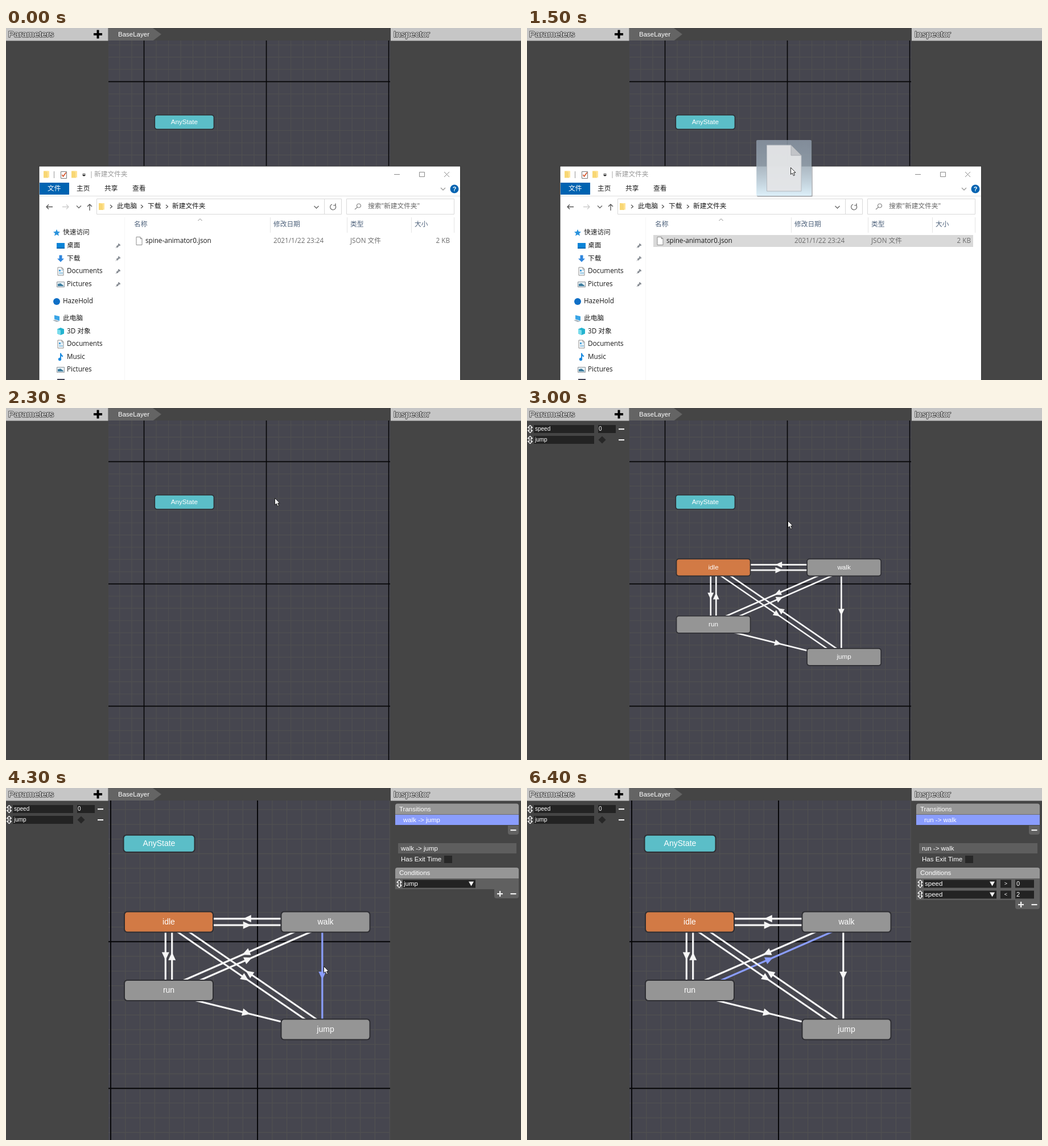
Recreate the animation shown at these times as an HTML page with a canvas. Size 905 px wide and 619 px high, loop 7400 ms.

```html
<!DOCTYPE html>
<html lang="zh">
<head>
<meta charset="utf-8">
<style>
html, body { margin: 0; width: 100%; height: 100%; overflow: hidden; background: #454545; }
canvas { display: block; }
</style>
</head>
<body>
<canvas id="stage" width="905" height="619"></canvas>
<script>
const c = document.getElementById('stage').getContext('2d');
const LOOP = 7400;
const UI = '"Liberation Sans", Arial, sans-serif';
const SHELL = '11.7px "Open Sans", "Noto Sans CJK SC", "Noto Sans CJK", sans-serif';
const BLUE = '#8a9dfd', FIELD = '#232323';

// Drawing helpers
function rect(x, y, w, h, fill) { c.fillStyle = fill; c.fillRect(x, y, w, h); }
function frame(x, y, w, h, color) {
  c.strokeStyle = color; c.lineWidth = 1; c.strokeRect(x + .5, y + .5, w - 1, h - 1);
}
function round(x, y, w, h, r, fill) {
  c.beginPath(); c.roundRect(x, y, w, h, r); c.fillStyle = fill; c.fill();
}
function disc(x, y, r, fill) { c.beginPath(); c.arc(x, y, r, 0, 7); c.fillStyle = fill; c.fill(); }
function path(d, x, y, fill, stroke, width = 1) {
  const p = new Path2D(d);
  c.save();
  c.translate(x, y);
  if (fill) { c.fillStyle = fill; c.fill(p); }
  if (stroke) { c.strokeStyle = stroke; c.lineWidth = width; c.stroke(p); }
  c.restore();
}
function text(s, x, y, color = '#fff', font = '11.5px ' + UI, align = 'left') {
  c.font = font; c.fillStyle = color; c.textAlign = align; c.textBaseline = 'middle';
  c.fillText(s, x, y);
}
const label = (s, x, y, color = '#1a1a1a', align) => text(s, x, y, color, SHELL, align);

// Cursor stops: time, x, y
const stops = [
  [300, 826, 106], [500, 690, 205], [700, 490, 314], [800, 400, 345], [900, 320, 370], [1000, 292, 378],
  [1200, 292, 378], [1300, 338, 336], [1400, 427, 309], [1500, 463, 245], [1600, 480, 175],
  [1700, 486, 135], [1800, 482, 114], [2000, 475, 150], [2300, 472, 158], [2800, 472, 158],
  [3000, 458, 198], [3200, 458, 198], [3300, 458, 205], [3600, 520, 235], [3900, 558, 302],
  [4100, 558, 313], [4400, 558, 313], [4700, 628, 235], [4900, 590, 207], [5200, 490, 270],
  [5400, 479, 275], [5700, 479, 275], [6300, 765, 180], [6400, 765, 180]
];
function cursorAt(t) {
  const i = Math.max(1, stops.findIndex(s => s[0] >= t));
  const [t0, x0, y0] = stops[i - 1], [t1, x1, y1] = stops[i];
  const k = (t - t0) / (t1 - t0);
  return [x0 + (x1 - x0) * k, y0 + (y1 - y0) * k];
}

// State graph
const nodes = {
  idle: [286, 235.5, '#d27a45'], walk: [561.5, 235.5, '#959595'],
  run: [286, 356, '#959595'], jump: [561.5, 424.5, '#959595']
};
const links = ['idle walk', 'walk idle', 'idle run', 'run idle', 'walk run', 'run walk',
  'idle jump', 'jump idle', 'walk jump', 'run jump'];

function node(name, x, y, w, h, fill, edge = '#2e2e33') {
  round(x - w / 2 - 2, y - h / 2 - 2, w + 4, h + 4, 6, edge);
  round(x - w / 2, y - h / 2, w, h, 4.5, fill);
  text(name, x, y + .5, '#fff', '14px ' + UI, 'center');
}
function link(name, selected) {
  const [a, b] = name.split(' ').map(n => nodes[n]);
  const angle = Math.atan2(b[1] - a[1], b[0] - a[0]);
  const half = Math.hypot(b[0] - a[0], b[1] - a[1]) / 2;
  const color = name === selected ? BLUE : '#f6f6f6';
  c.save();
  c.translate((a[0] + b[0]) / 2, (a[1] + b[1]) / 2);
  c.rotate(angle);
  path(`M${-half} 0H${half}`, 0, 5.7, null, color, 3.2);
  path('M-7 -6.5L7 0L-7 6.5Z', 0, 5.7, color);
  c.restore();
}
function gridLines(step, color, width, skip) {
  c.beginPath();
  for (let i = -20; i < 40; i++) {
    if (skip && i % 10 === 0) continue;
    const x = 184 + i * step, y = 270.3 + i * step;
    c.moveTo(x, -200); c.lineTo(x, 900);
    c.moveTo(-200, y); c.lineTo(1000, y);
  }
  c.strokeStyle = color; c.lineWidth = width; c.stroke();
}
function graph(t) {
  const away = t < 3200 ? 1 : t < 3300 ? .5 : 0;
  const scale = 1 - away / 6;
  c.save();
  c.beginPath(); c.rect(180, 22, 495, 597); c.clip();
  rect(180, 22, 495, 597, '#46464f');
  c.translate(89.2 * away, 84.1 * away);
  c.scale(scale, scale);
  gridLines(25.8, '#4f4f51', 1.5, true);
  gridLines(258, '#050507', 1.9);
  if (t >= 2400) {
    const selected = t < 4300 ? '' : t < 5300 ? 'walk jump' : 'run walk';
    links.forEach(l => link(l, selected));
    for (const n in nodes) {
      const [x, y, fill] = nodes[n];
      node(n, x, y, 154, 34, fill, n === 'walk' && t >= 3600 && t < 4300 ? BLUE : undefined);
    }
  }
  node('AnyState', 269, 97.7, 123, 28, '#5bbec8');
  c.restore();
}

// Side panels
const minus = (x, y) => rect(x - 5, y - 1, 10, 2.2, '#f0f0f0');
const plus = (x, y) => { minus(x, y); rect(x - 1, y - 5, 2.2, 10, '#f0f0f0'); };
const grip = (x, y) => path('M0-6.5L4-2.5H1.6V2.5H4L0 6.5L-4 2.5H-1.6V-2.5H-4Z', x, y, '#3a3a3a', '#f2f2f2', 1.3);
const small = (s, x, y) => text(s, x, y, '#fff', '10px ' + UI);

function title(s, x) {
  c.font = '15.5px ' + UI; c.textBaseline = 'middle'; c.textAlign = 'left'; c.lineJoin = 'round';
  c.strokeStyle = '#555'; c.lineWidth = 2.2;
  c.strokeText(s, x, 11.5);
  text(s, x, 11.5, '#f4f4f4', c.font);
}
function chrome() {
  rect(0, 0, 905, 619, '#454545');
  rect(0, 0, 179.5, 22.5, '#c6c6c6');
  rect(676, 0, 229, 22.5, '#c6c6c6');
  title('Parameters', 4);
  title('Inspector', 681);
  rect(154, 9, 15, 4, '#000');
  rect(159.5, 3.5, 4, 15, '#000');
  path('M180 0H258L273 11L258 22.5H180Z', 0, 0, '#646464');
  text('BaseLayer', 197, 11.5);
}
function parameters() {
  ['speed', 'jump'].forEach((name, i) => {
    const y = 37 + i * 19;
    grip(5.5, y);
    rect(12, y - 7, 106, 14, FIELD);
    small(name, 14, y);
    minus(166, y);
  });
  rect(125, 30, 31, 14, FIELD);
  small('0', 126, 37);
  path('M0-6.5L6.5 0L0 6.5L-6.5 0Z', 132, 56, '#272727');
}
function listHeader(s, y) {
  round(684, y, 217, 19, [4, 4, 0, 0], '#969696');
  text(s, 691, y + 10);
}
function inspector(t) {
  listHeader('Transitions', 27.5);
  if (t < 4300) {
    ['walk -> idle', 'walk -> run', 'walk -> jump'].forEach((s, i) => {
      rect(684, 47 + i * 19, 217, 18, '#606060');
      text(s, 698, 56.5 + i * 19);
    });
    round(882, 104, 19, 16, [0, 0, 4, 4], '#666');
    minus(891.5, 112);
    return;
  }
  const late = t >= 5300;
  const name = late ? 'run -> walk' : 'walk -> jump';
  rect(684, 47, 217, 18, BLUE);
  text(name, 698, 56.5);
  round(882, 66, 19, 16, [0, 0, 4, 4], '#626262');
  minus(891.5, 74);
  rect(689, 97, 208, 18, '#5e5e5e');
  text(name, 694, 106.5);
  text('Has Exit Time', 694, 126);
  rect(770, 119, 14, 13, '#272727');
  listHeader('Conditions', 140);
  const rows = late ? [['speed', '>', '0'], ['speed', '<', '2']] : [['jump']];
  rows.forEach(([param, op, value], i) => {
    const y = 168.5 + i * 19;
    rect(684, y - 9.5, 217, 19, '#606060');
    grip(691, y);
    rect(697, y - 7, 128, 14, FIELD);
    text(param, 699, y + .5);
    path('M-4.5-4H4.5L0 4Z', 817.5, y, '#f2f2f2');
    if (!op) return;
    rect(832, y - 7, 19, 14, FIELD);
    text(op, 841.5, y, '#fff', '9px ' + UI, 'center');
    rect(858, y - 7, 33, 14, FIELD);
    text(value, 860, y, '#fff', '11px ' + UI);
  });
  const foot = 159 + rows.length * 19;
  round(858, foot, 43, 16, [0, 0, 4, 4], '#606060');
  plus(868, foot + 8);
  minus(891.5, foot + 8);
}

// File window
const folder = (x, y) => {
  rect(x, y - 6, 8, 12, '#f8d775');
  path('M2-6H10V6L7 4V-4Z', x, y, '#ffe394');
};
const sheet = (x, y) => path('M-5-7H2L5-4V7H-5ZM2-7V-4H5', x, y, '#fff', '#8d8d8d');
const chevron = (x, y, color = '#666') => path('M-4-2L0 2L4-2', x, y, null, color, 1.3);
const icons = {
  star: (x, y) => path('M0-6L1.8-2L6-1.6L2.8 1.2L4 5.5L0 3.2L-4 5.5L-2.8 1.2L-6-1.6L-1.8-2Z', x, y, '#2a93dd'),
  desk: (x, y) => { rect(x - 7, y - 5, 14, 10, '#0a84d8'); rect(x - 7, y + 3, 14, 2, '#0868b0'); },
  down: (x, y) => path('M-2.5-6H2.5V0H6L0 6L-6 0H-2.5Z', x, y, '#2f86dd'),
  doc: (x, y) => {
    sheet(x, y);
    rect(x - 3, y - 3, 3, 3, '#3d9bd8');
    path('M1-2H4M-3 2H4M-3 4H4', x, y, null, '#6aaed6');
  },
  pic: (x, y) => {
    rect(x - 6.5, y - 5, 13, 10, '#e9f1f5'); frame(x - 7, y - 5, 14, 10, '#8a9299');
    path('M-5 3V-1L0-2L5 2V3Z', x, y, '#3d7c9e');
  },
  dot: (x, y) => disc(x, y, 6, '#0f6fc6'),
  pc: (x, y) => {
    path('M-4-6L5-4V4L-4 1Z', x, y, '#3aa5e6');
    path('M-7 3L-3 2L5 5L0 6Z', x, y, '#a9b6bf');
  },
  cube: (x, y) => {
    path('M-6-4L0-6.5L6-4V4L0 6.5L-6 4Z', x, y, '#25b3cf');
    path('M-6-4L0-2V6.5L-6 4Z', x, y, '#7adcec');
  },
  note: (x, y) => { disc(x - 1.5, y + 4, 2.7, '#1c8be0'); path('M0 4V-6Q1-2 4-1', x, y, null, '#1c8be0', 2); }
};
const sidebar = [
  ['star', '快速访问', 360, 0], ['desk', '桌面', 383, 2], ['down', '下载', 405.5, 2], ['doc', 'Documents', 428, 2],
  ['pic', 'Pictures', 451, 2], ['dot', 'HazeHold', 481, 0], ['pc', '此电脑', 511, 0], ['cube', '3D 对象', 533.5, 1],
  ['doc', 'Documents', 556, 1], ['note', 'Music', 578.5, 1], ['pic', 'Pictures', 601, 1]
];

function explorer(t) {
  rect(57, 242.5, 742, 377, '#343434');
  rect(58.5, 243.5, 739.5, 376, '#fff');

  // Title bar
  folder(66, 257.5);
  rect(84, 252, 1, 12, '#999');
  frame(96, 252, 11, 13, '#777');
  path('M-3 0L-1 3L4-4', 101.5, 258, null, '#d65a33', 1.8);
  folder(115, 257.5);
  path('M-3.5 0H3.5L0 3Z', 137, 258, '#222');
  rect(134.5, 256, 5, 1, '#444');
  rect(149.5, 252, 1, 12, '#aaa');
  label('新建文件夹', 155, 257.5, '#999');
  rect(682, 257, 10, 1, '#888');
  frame(726, 253, 10, 9, '#888');
  path('M-4.5-4.5L4.5 4.5M4.5-4.5L-4.5 4.5', 774.5, 257.5, null, '#888');

  // Tabs
  rect(59, 272, 52, 21, '#0063b1');
  label('文件', 73, 283, '#fff');
  label('主页', 124, 283);
  label('共享', 173, 283);
  label('查看', 222, 283);
  chevron(768, 283, '#999');
  disc(788, 283, 7.5, '#0063b1');
  text('?', 788, 283.5, '#fff', 'bold 11px ' + UI, 'center');
  rect(59, 295, 739, 1, '#dedede');

  // Address and search
  path('M6 0H-5M-1-4L-5 0L-1 4', 76, 314.5, null, '#555', 1.3);
  path('M-6 0H5M1-4L5 0L1 4', 105, 314.5, null, '#ccc', 1.3);
  chevron(128, 314.5);
  path('M0 6V-5M-4-1L0-5L4-1', 147, 315, null, '#555', 1.3);
  frame(159, 300, 431, 28, '#d9d9d9');
  rect(559, 300, 1, 28, '#d9d9d9');
  folder(163, 314);
  [185, 239, 283].forEach(x => path('M-2-3L1.5 0L-2 3', x, 314, null, '#555', 1.2));
  label('此电脑', 195, 314);
  label('下载', 249, 314);
  label('新建文件夹', 292, 314);
  chevron(545.5, 315);
  path('M3-3.5A5 5 0 1 1-2-4.5M4-6V-2.5H0', 575, 314.5, null, '#666', 1.2);
  frame(598, 300, 190, 28, '#d9d9d9');
  path('M2-5A3.5 3.5 0 1 1 1.9-5M-.5 1L-5 5', 618, 314, null, '#888', 1.2);
  label('搜索"新建文件夹"', 636, 314, '#666');

  // Columns and file row
  if (t >= 800 && t < 900) rect(209, 333, 255, 27, '#d9ebf9');
  path('M-3.5 2L0-1.5L3.5 2', 341, 337, null, '#888');
  [464, 599, 712, 787].forEach(x => rect(x, 333, 1, 27, '#e5e5e5'));
  [['名称', 225], ['修改日期', 470], ['类型', 605], ['大小', 718]].forEach(([s, x]) => label(s, x, 346, '#4c607a'));
  if (t >= 900) rect(222, 364, 562, 21, t < 1200 ? '#e5f3ff' : t < 1300 ? '#cce8ff' : '#d9d9d9');
  sheet(234, 374.5);
  label('spine-animator0.json', 245, 374.5);
  label('2021/1/22 23:24', 470, 374.5, '#6d6d6d');
  label('JSON 文件', 605, 374.5, '#6d6d6d');
  label('2 KB', 780, 374.5, '#6d6d6d', 'right');

  // Sidebar; level 2 entries are pinned
  rect(208, 333, 1, 286, '#f5f5f5');
  sidebar.forEach(([icon, name, y, level]) => {
    icons[icon](level ? 96 : 89, y);
    label(name, level ? 107 : 100, y);
    if (level === 2) path('M1-4L4-1L1 0L-1 3L-3 1L0-1ZM-2 2L-4 4', 197, y, '#8a8f96', '#8a8f96');
  });
  rect(90, 617, 13, 2, '#445');
}

function dragImage(x, y) {
  round(x + 1, y + 1, 98, 99, 2, 'rgba(60,70,80,.35)');
  const g = c.createLinearGradient(0, y, 0, y + 98);
  g.addColorStop(0, 'rgba(150,163,178,.75)');
  g.addColorStop(.45, 'rgba(165,180,192,.75)');
  g.addColorStop(1, 'rgba(222,242,252,.95)');
  round(x, y, 97, 98, 2, g);
  path('M18.5 9H61L79 27V90H18.5Z', x, y, 'rgba(228,229,231,.95)', '#b5bac0');
  path('M61 9L79 27H61Z', x, y, '#c2c4c8', '#a9adb2');
}

function draw(t) {
  const step = Math.floor(t / 100) * 100;
  chrome();
  graph(step);
  if (step >= 2400) parameters();
  if (step >= 3600) inspector(step);
  if (step < 2200) explorer(step);
  if (step >= 300 && step < 6400) {
    const [x, y] = cursorAt(step);
    if (step >= 1300 && step < 2200) dragImage(x - 60, y - 48);
    path('M0 0V12L2.8 9.6L4.9 14.2L6.9 13.3L5 8.8H8.5Z', x + .5, y + .5, '#fff', '#111', .9);
  }
}

function tick(now) {
  draw(now % LOOP);
  requestAnimationFrame(tick);
}
draw(0);
requestAnimationFrame(tick);
</script>
</body>
</html>
```
